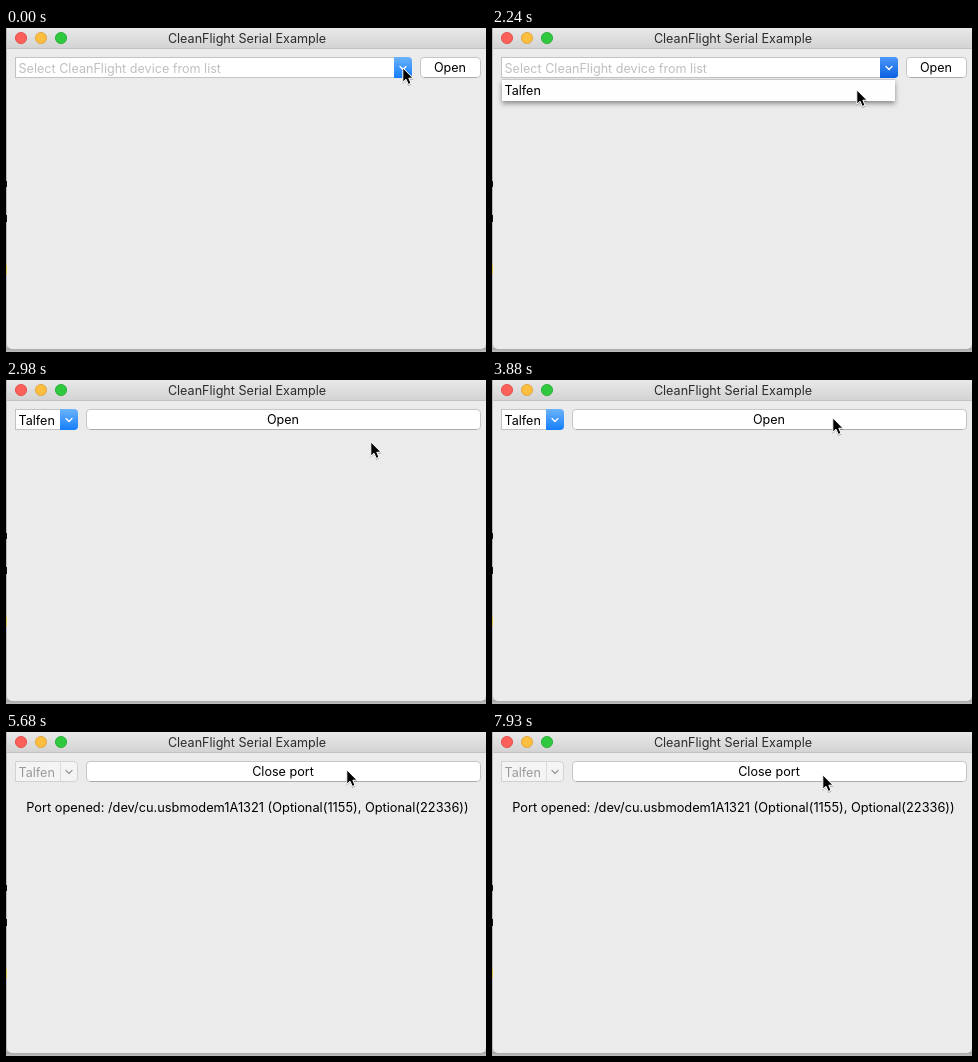
Recreate the animation shown at these times as an HTML page. Size 480 by 324 pixels, loop 8 s.

```html
<!DOCTYPE html>
<html lang="en">
<head>
<meta charset="utf-8">
<title>CleanFlight Serial Example</title>
<style>
  html, body { margin: 0; width: 100%; height: 100%; overflow: hidden; background: #ebebeb; }
  svg { display: block; width: 480px; height: 324px; }
  text { font: 12.6px Inter, "Open Sans", sans-serif; fill: #000; }
  .mid { text-anchor: middle; }
  .title { fill: #2c2c2c; }
  .hint { fill: #bfbfbf; }
  .off { fill: #9a9a9a; }
  .status { font-size: 12.8px; }
  .field { fill: #fff; stroke: #c3c3c3; }
  .button { fill: #fff; stroke: #c6c6c6; }
  .lip { stroke: #acacac; }
  .chevron { fill: none; stroke: #fff; stroke-width: 1.3; stroke-linecap: round; stroke-linejoin: round; }
  .chevron.dim { stroke: #9c9c9c; }

  .wide, .narrow, .opened, .popup, .item, .held, .pressed, .cursor {
    animation: 8s step-end infinite;
  }
  .wide { animation-name: wide; }
  .narrow { animation-name: narrow; }
  .opened { animation-name: opened; }
  .popup { animation-name: popup; }
  .item { animation-name: item; }
  .held { animation-name: held; }
  .pressed { animation-name: pressed; }
  .cursor { animation-name: cursor; }

  @keyframes wide { 0% { opacity: 1 } 35.375%, 100% { opacity: 0 } }
  @keyframes narrow { 0% { opacity: 0 } 35.375% { opacity: 1 } 71%, 100% { opacity: 0 } }
  @keyframes opened { 0% { opacity: 0 } 71%, 100% { opacity: 1 } }
  @keyframes popup {
    0% { opacity: 0 }
    13.125% { opacity: 1 }
    35.375% { opacity: .5 }
    37.25%, 100% { opacity: 0 }
  }
  @keyframes item { 0% { opacity: 0 } 16.75%, 100% { opacity: 1 } }
  @keyframes held { 0% { opacity: 0 } 13.125%, 100% { opacity: 1 } }
  @keyframes pressed { 0% { opacity: 0 } 61.625%, 100% { opacity: 1 } }
  @keyframes cursor {
    0% { transform: translate(396px, 39px) }
    22.375% { transform: translate(391px, 42px) }
    24.25% { transform: translate(380px, 50px) }
    26.125% { transform: translate(368px, 58px) }
    28% { transform: translate(364px, 61px) }
    41% { transform: translate(369px, 59px) }
    42.875% { transform: translate(375px, 54px) }
    44.75% { transform: translate(364px, 47px) }
    46.625% { transform: translate(347px, 40px) }
    48.5% { transform: translate(340px, 37px) }
    74.75% { transform: translate(340px, 40px) }
    76.625% { transform: translate(340px, 46px) }
    78.5% { transform: translate(339px, 53px) }
    80.375% { transform: translate(338px, 58px) }
    82.25% { transform: translate(337px, 60px) }
    84.125% { transform: translate(336px, 60px) }
    86% { transform: translate(336px, 58px) }
    87.875% { transform: translate(334px, 55px) }
    95.375% { transform: translate(333px, 51px) }
    97.25% { transform: translate(331px, 46px) }
    99.125%, 100% { transform: translate(330px, 42px) }
  }
</style>
</head>
<body>
<svg viewBox="0 0 480 324">
  <defs>
    <linearGradient id="bar" x2="0" y2="1">
      <stop stop-color="#e9e9e9"/><stop offset="1" stop-color="#d3d3d3"/>
    </linearGradient>
    <linearGradient id="blue" x2="0" y2="1">
      <stop stop-color="#6cb3fa"/><stop offset="1" stop-color="#157efb"/>
    </linearGradient>
    <linearGradient id="deep" x2="0" y2="1">
      <stop stop-color="#4c97f8"/><stop offset="1" stop-color="#0a60e0"/>
    </linearGradient>
    <linearGradient id="edge" x2="0" y2="1">
      <stop stop-color="#a2a2a2"/><stop offset="1" stop-color="#bebebe"/>
    </linearGradient>
    <filter id="drop" x="-5%" y="-50%" width="110%" height="220%">
      <feDropShadow dx="0" dy="2.5" stdDeviation="2.4" flood-opacity=".42"/>
    </filter>
    <filter id="soft" x="-30%" y="-20%" width="160%" height="150%">
      <feDropShadow dx="0" dy=".8" stdDeviation=".6" flood-opacity=".35"/>
    </filter>
    <path id="cap" d="M0 29h14a4 4 0 0 1 4 4v13a4 4 0 0 1-4 4H0z"/>
    <path id="chev" d="M6 38.5l3 3 3-3"/>
  </defs>

  <!-- window -->
  <rect width="480" height="324" fill="#b9b9b9"/>
  <rect y="320" width="480" height="4" fill="url(#edge)"/>
  <path d="M1 0H480V316a5 5 0 0 1-5 5H6a5 5 0 0 1-5-5z" fill="#ebebeb"/>
  <rect x="1" width="479" height="20" fill="url(#bar)"/>
  <path d="M1 20.5H480" stroke="#c2c2c2"/>
  <path d="M0 153h1v6h-1zM0 187h1v7h-1z" fill="#111"/>
  <path d="M0 237h1v9h-1z" fill="#d9c23c"/>
  <circle cx="15" cy="10" r="5.6" fill="#fc605b" stroke="#e0443e" stroke-width=".8"/>
  <circle cx="35" cy="10" r="5.6" fill="#fdbd3f" stroke="#dea034" stroke-width=".8"/>
  <circle cx="55" cy="10" r="5.6" fill="#2fc940" stroke="#1fa82f" stroke-width=".8"/>
  <text class="title mid" x="241" y="15">CleanFlight Serial Example</text>

  <!-- nothing chosen -->
  <g class="wide">
    <rect class="field" x="9.5" y="29.5" width="390" height="20"/>
    <text class="hint" x="12.5" y="45">Select CleanFlight device from list</text>
    <g transform="translate(388)">
      <use href="#cap" fill="url(#blue)"/>
      <use class="held" href="#cap" fill="url(#deep)"/>
      <use class="chevron" href="#chev"/>
    </g>
    <rect class="button" x="414.5" y="29.5" width="60" height="20" rx="3.5"/>
    <path class="lip" d="M418 49.5h53"/>
    <text class="mid" x="444" y="44">Open</text>
  </g>

  <!-- device chosen -->
  <g class="narrow">
    <rect class="field" x="9.5" y="29.5" width="55" height="20"/>
    <text x="12.5" y="45">Talfen</text>
    <g transform="translate(54)">
      <use href="#cap" fill="url(#blue)"/>
      <use class="chevron" href="#chev"/>
    </g>
    <rect class="button" x="80.5" y="29.5" width="394" height="20" rx="3.5"/>
    <path class="lip" d="M84 49.5h387"/>
    <text class="mid" x="277" y="44">Open</text>
    <g class="pressed">
      <rect x="80" y="29" width="395" height="21" rx="4" fill="url(#deep)"/>
      <text class="mid" x="277" y="44" style="fill:#e6f0fe">Open</text>
    </g>
  </g>

  <!-- port open -->
  <g class="opened">
    <path d="M9.5 29.5H68a3.5 3.5 0 0 1 3.5 3.5V46a3.5 3.5 0 0 1-3.5 3.5H9.5z" fill="#f4f4f4" stroke="#d2d2d2"/>
    <path d="M54.5 30v19" stroke="#dcdcdc"/>
    <text class="off" x="12.5" y="45">Talfen</text>
    <use class="chevron dim" href="#chev" x="54"/>
    <rect class="button" x="80.5" y="29.5" width="394" height="20" rx="3.5"/>
    <path class="lip" d="M84 49.5h387"/>
    <text class="mid" x="277" y="44">Close port</text>
    <text class="status mid" x="241.5" y="80">Port opened: /dev/cu.usbmodem1A1321 (Optional(1155), Optional(22336))</text>
  </g>

  <g class="popup">
    <rect x="10" y="52" width="393" height="21" fill="#fefefe" filter="url(#drop)"/>
    <path d="M10 51.5H403" stroke="#c9c9c9"/>
    <text class="item" x="12.5" y="67">Talfen</text>
  </g>

  <g class="cursor">
    <path d="M.8 .9V15.2L4 12.2l2.3 5.2 2.7-1.1L6.8 11.2H11z" stroke="#fff" stroke-width="1" filter="url(#soft)"/>
  </g>
</svg>
</body>
</html>
```
